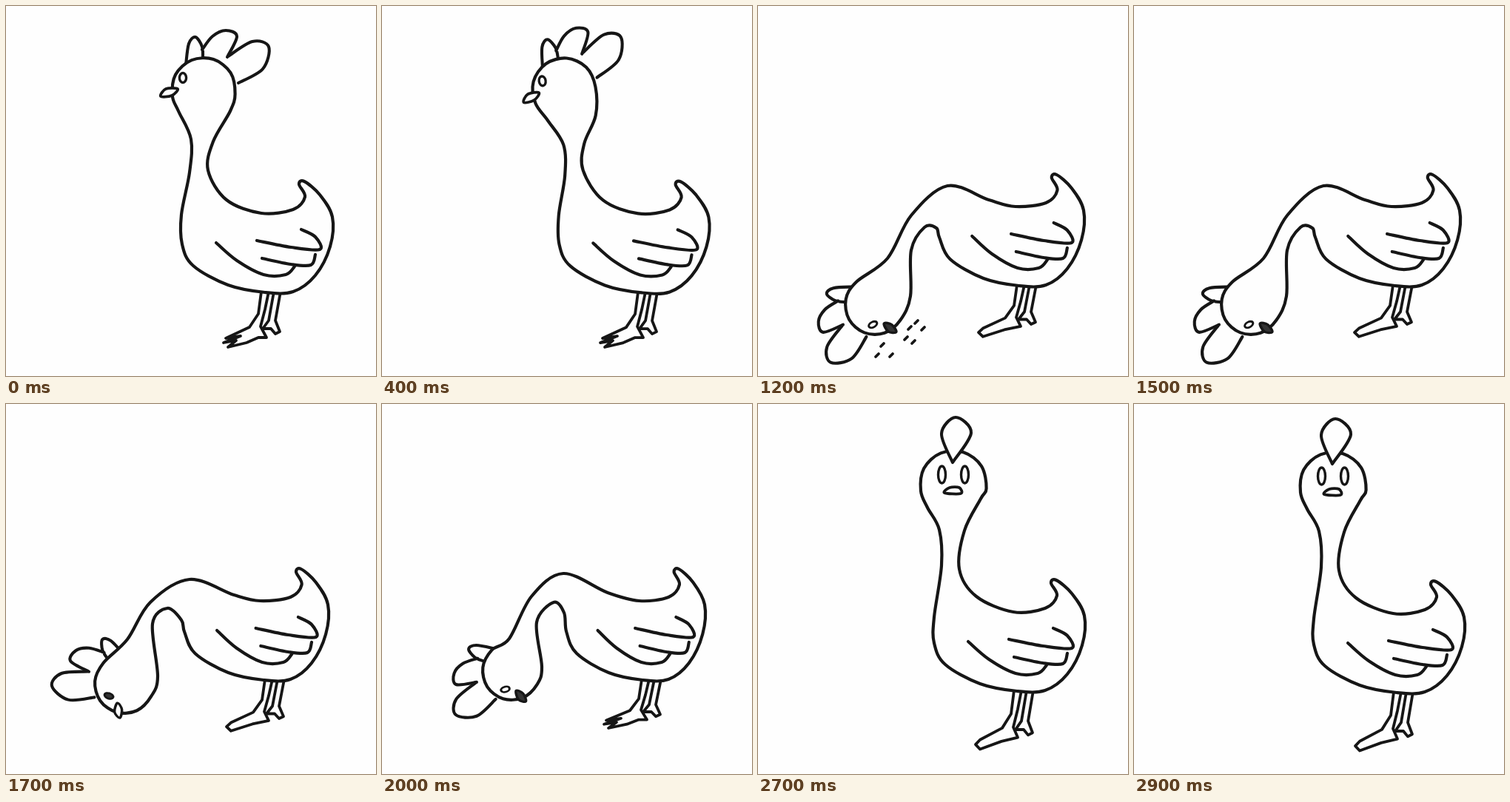
These frames come from a looping animation (500x500 px, 3000 ms). An HTML page with a canvas:

```html
<!DOCTYPE html>
<html lang="en">
<head>
<meta charset="utf-8">
<title>Pecking hen</title>
<style>
html, body { margin: 0; width: 100%; height: 100%; overflow: hidden; background: #fefefe; }
canvas { display: block; width: 500px; height: 500px; }
</style>
</head>
<body>
<canvas id="stage" width="500" height="500"></canvas>
<script>
const ctx = document.getElementById('stage').getContext('2d');
const INK = '#161616', PAPER = '#fefefe', SHADE = '#333';
const STEP = 100, LOOP = 3000, PIVOT = [265, 250];
const RAD = Math.PI / 180, HEAD_SIZE = 43;

// Body parts on the stage, as x, y pairs
const TRUNK = [345,280, 388,275, 404,258, 396,241, 403,237, 424,255, 441,285, 438,325, 418,364, 388,386,
  350,387, 300,377, 253,351, 238,322];
const WING = [
  [284,320, 312,344, 348,363, 378,363, 390,352],
  [339,317, 385,326, 424,329, 418,312, 399,302],
  [346,341, 385,349, 412,350, 418,336]
];
const HIND_LEG = [362,386, 355,425, 347,436, 358,436, 364,443, 370,440, 364,425, 371,386];
const SHIN = [344,433, 350,410, 355,386, 345,386, 341,416, 329,434];
const TOES = [297,449, 317,446, 294,455, 311,452, 300,461, 325,455, 341,448, 352,448];
const SOLE = [299,449, 293,455, 299,461, 328,451, 350,446];

// Head parts relative to the head's centre
const COMB = [
  [-24,-33, -20,-62, -11,-71, -2,-58, -1,-42],
  [-2,-54, 12,-72, 30,-80, 45,-72, 32,-44],
  [33,-45, 66,-65, 88,-58, 80,-28, 47,-9]
];
const COMB_AXIS = -68;
const BEAK = [-58,9, -51,-1, -35,-1, -43,8];
const TUFT = [-1,-29, -16,-68, 3,-90, 24,-69, -1,-29];
const FRONT_BEAK = [-12,12, -5,5, 8,5, 10,13];

const CRUMBS = [205,435, 214,427, 223,436, 200,449, 210,454, 168,458, 161,472, 180,472];

// head: x, y, radius, turn; body: dx, dy, squeeze; legs: dx, length
const stand = { head: [267,113,43,0], body: [0,0,0], legs: [0,1],
  nape: [303,142, 280,183, 273,222, 298,262], throat: [237,282, 248,225, 250,180, 233,142] };
const reach = { head: [117,233,40,-82], body: [4,4,.055], legs: [10,.95], dark: 'eye',
  nape: [165,202, 215,212, 260,221, 305,266], throat: [254,293, 240,266, 205,254, 150,269] };
const peck = { head: [158,404,40,-118], body: [-1,-9,.04], legs: [5,.93], dark: 'beak', flat: true,
  nape: [175,341, 207,283, 256,243, 312,262], throat: [241,300, 225,299, 207,330, 206,392] };
const lift = { head: [160,378,40,-72], body: [-6,-14,.045], legs: [5,.93], dark: 'eye', flat: true,
  nape: [164,318, 195,268, 248,237, 308,258], throat: [237,292, 218,276, 198,297, 205,368] };
const tuck = { head: [175,361,39,-105], body: [-5,-14,.08], legs: [6,.88], dark: 'beak',
  nape: [172,317, 202,260, 245,229, 305,255], throat: [246,282, 232,268, 209,295, 216,355] };
const front = { head: [269,110,45,0], body: [5,3,0], legs: [6,1.06], facing: true, flat: true,
  nape: [306,130, 284,173, 277,225, 300,262], throat: [243,290, 253,220, 250,172, 234,142] };

// time, pose, dx, dy
const keys = [
  [0, stand], [300, stand], [800, reach], [900, reach], [1200, peck], [1400, lift], [1500, peck],
  [1700, lift], [2000, tuck], [2200, reach, -16, -3], [2400, stand, -5, -6.5], [2500, stand, -5, -6.5],
  [2600, front, -5, -2], [2700, front, -5, -2], [2900, front], [LOOP, front]
];

const lerp = (a, b, m) => a + (b - a) * m;
const lerpAll = (u, v, m) => u.map((n, i) => lerp(n, v[i], m));
const ease = m => m * m * (3 - 2 * m);

// Apply a function to every x, y pair
function map(pts, fn) {
  const out = [];
  for (let i = 0; i < pts.length; i += 2) out.push(...fn(pts[i], pts[i + 1]));
  return out;
}

function polar([x, y]) {
  const a = Math.atan2(y - PIVOT[1], x - PIVOT[0]);
  return [Math.hypot(x - PIVOT[0], y - PIVOT[1]), a > 0 ? a - 2 * Math.PI : a];
}

// The head swings around the pivot; everything else moves straight
function blend(p, q, m) {
  const pose = { ...(m < .5 ? p : q) };
  if (p.facing !== q.facing) return p;
  for (const part of ['head', 'body', 'legs', 'nape', 'throat']) pose[part] = lerpAll(p[part], q[part], m);
  const [r, a] = lerpAll(polar(p.head), polar(q.head), m);
  pose.head[0] = PIVOT[0] + r * Math.cos(a);
  pose.head[1] = PIVOT[1] + r * Math.sin(a);
  return pose;
}

// Smooth curve through the points
function curve(pts, closed) {
  const n = pts.length / 2;
  const at = i => {
    const k = closed ? (i + n) % n : Math.max(0, Math.min(n - 1, i));
    return [pts[2 * k], pts[2 * k + 1]];
  };
  ctx.beginPath();
  ctx.moveTo(...at(0));
  for (let i = 0; i < (closed ? n : n - 1); i++) {
    const [a, b, c, d] = [at(i - 1), at(i), at(i + 1), at(i + 2)];
    ctx.bezierCurveTo(b[0] + (c[0] - a[0]) / 6, b[1] + (c[1] - a[1]) / 6,
      c[0] - (d[0] - b[0]) / 6, c[1] - (d[1] - b[1]) / 6, c[0], c[1]);
  }
  if (closed) ctx.closePath();
}

function ink(width, fill) {
  ctx.lineWidth = width;
  if (fill) { ctx.fillStyle = fill; ctx.fill(); }
  ctx.stroke();
}

// Round skull, open towards the neck
function skull({ head: [x, y, r], nape, throat }) {
  const neck = Math.atan2((nape[1] + throat[7]) / 2 - y, (nape[0] + throat[6]) / 2 - x);
  const pts = [];
  for (let a = 80; a <= 280; a += 40) pts.push(x + r * Math.cos(neck + a * RAD), y + r * Math.sin(neck + a * RAD));
  return pts;
}

function drawLegs({ legs: [dx, length], body, flat }) {
  const place = (x, y) => [x + dx, 386 + (y - 386) * length + body[1]];
  for (const leg of [HIND_LEG, [...SHIN, ...(flat ? SOLE : TOES)]]) {
    const pts = map(leg, place);
    ctx.beginPath();
    for (let i = 0; i < pts.length; i += 2) ctx.lineTo(pts[i], pts[i + 1]);
    ctx.closePath();
    ink(3.8, PAPER);
  }
}

function drawComb({ head: [x, y, r, turn], facing }) {
  const size = facing ? 1 : r / HEAD_SIZE, a = turn * 1.1 * RAD;
  const flip = turn < -40, c2 = Math.cos(2 * COMB_AXIS * RAD), s2 = Math.sin(2 * COMB_AXIS * RAD);
  for (const lobe of facing ? [TUFT] : COMB) {
    curve(map(lobe, (u, v) => {
      if (flip) [u, v] = [u * c2 + v * s2, u * s2 - v * c2];
      return [x + size * (u * Math.cos(a) - v * Math.sin(a)), y + size * (u * Math.sin(a) + v * Math.cos(a))];
    }));
    ink(4.1, PAPER);
  }
}

function drawFace({ head: [x, y, r, turn], facing, dark }) {
  const tone = part => dark === part ? SHADE : PAPER;
  const eye = (u, v, rx, ry) => {
    ctx.beginPath();
    ctx.ellipse(u, v, rx, ry, 0, 0, 2 * Math.PI);
    ink(3.4, tone('eye'));
  };
  ctx.save();
  ctx.translate(x, y);
  if (facing) {
    for (const side of [-1, 1]) eye(side * 15.5, -12.5, 5, 11.5);
  } else {
    const size = r / HEAD_SIZE, short = 1 - .15 * Math.min(1, -turn / 60);
    ctx.rotate(turn * RAD);
    ctx.scale(size * short, size);
    eye(-28, -16, 4.6, 6.5);
  }
  curve(facing ? FRONT_BEAK : BEAK, true);
  ink(3.8, tone('beak'));
  ctx.restore();
}

function drawHen(pose) {
  const [dx, dy, squeeze] = pose.body;
  const place = (x, y) => [x + dx + squeeze * (441 - x), y + dy];
  if (!pose.facing) drawComb(pose);
  drawLegs(pose);
  curve([...skull(pose), ...pose.nape, ...map(TRUNK, place), ...pose.throat], true);
  ink(4.2, PAPER);
  if (pose.facing) drawComb(pose);
  for (const feather of WING) {
    curve(map(feather, place));
    ink(4.2);
  }
  drawFace(pose);
}

function drawCrumbs() {
  ctx.beginPath();
  map(CRUMBS, (x, y) => {
    ctx.moveTo(x - 2, y + 2);
    ctx.lineTo(x + 2, y - 2);
    return [];
  });
  ink(3.8);
}

function render(time) {
  const next = keys.findIndex(k => k[0] > time);
  const [t0, p, x0 = 0, y0 = 0] = keys[next - 1];
  const [t1, q, x1 = 0, y1 = 0] = keys[next];
  const m = ease((time - t0) / (t1 - t0));
  ctx.setTransform(1, 0, 0, 1, 0, 0);
  ctx.fillStyle = PAPER;
  ctx.fillRect(0, 0, 500, 500);
  ctx.strokeStyle = INK;
  ctx.lineCap = ctx.lineJoin = 'round';
  ctx.translate(lerp(x0, x1, m), lerp(y0, y1, m));
  drawHen(blend(p, q, m));
  if (time >= 1200 && time < 1400) drawCrumbs();
}

const start = performance.now();
function tick() {
  const t = (performance.now() - start) % LOOP;
  render(Math.floor(t / STEP) * STEP);
  requestAnimationFrame(tick);
}
tick();
</script>
</body>
</html>
```
